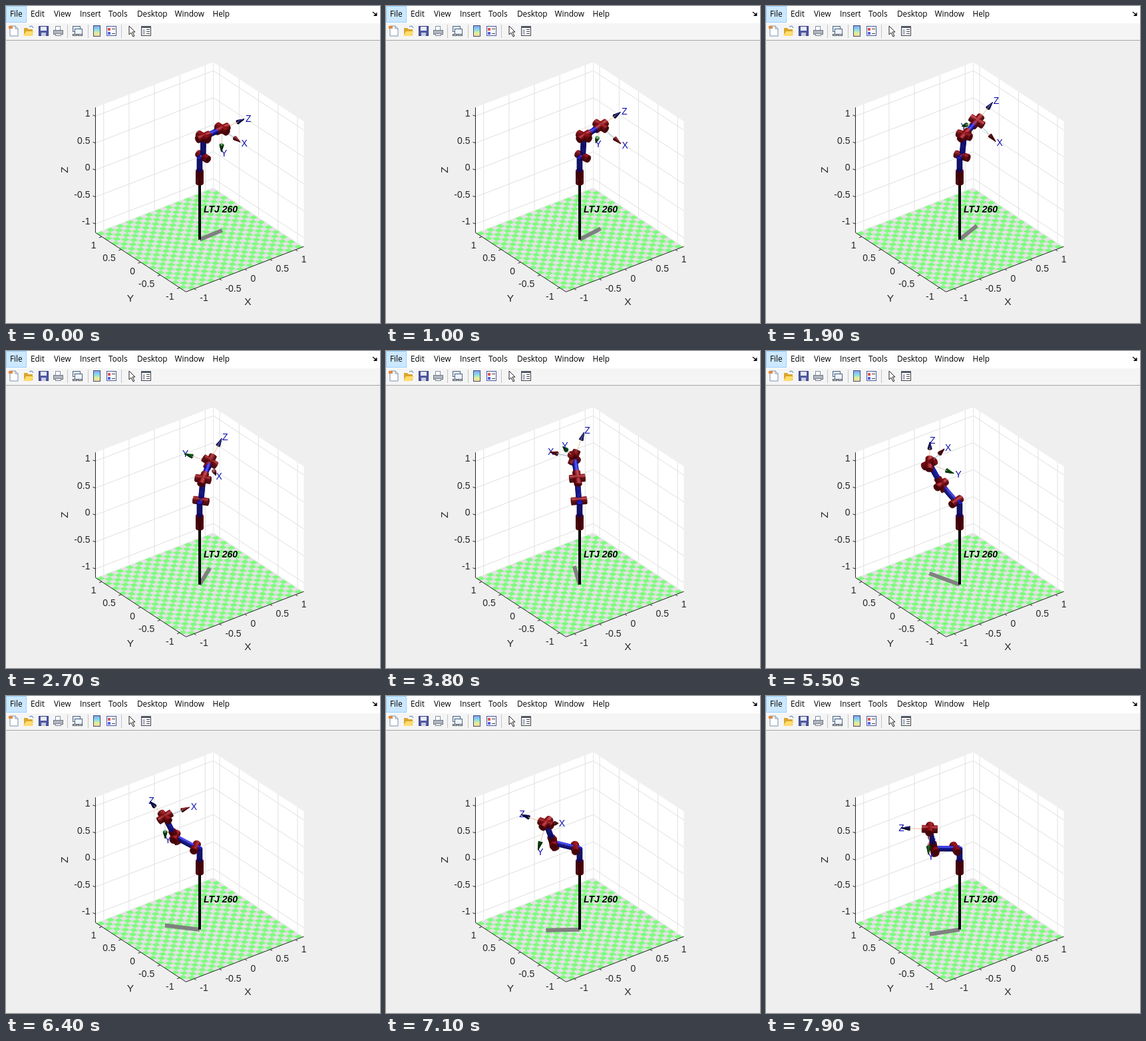
An HTML page with a canvas for the animation above (8 s loop, 562 by 476 pixels).

```html
<!DOCTYPE html>
<html lang="en">
<head>
<meta charset="utf-8">
<title>Robot arm plot</title>
<style>
  html, body { margin: 0; width: 100%; height: 100%; overflow: hidden; background: #efefef; }
  canvas { display: block; }
</style>
</head>
<body>
<canvas id="stage" width="562" height="476"></canvas>
<script>
const g = document.getElementById('stage').getContext('2d');
const SANS = '"Liberation Sans", Arial, sans-serif';
const LIM = 1.162, RAD = Math.PI / 180;
const VIEW = [-0.527, -0.687, 0.5];
const TICKS = [-1, -0.5, 0, 0.5, 1];

// ---------- vectors and projection ----------
const add = (p, v, k = 1) => p.map((c, i) => c + k * v[i]);
const dot = (a, b) => a[0] * b[0] + a[1] * b[1] + a[2] * b[2];
const cross = (a, b) => [a[1] * b[2] - a[2] * b[1], a[2] * b[0] - a[0] * b[2], a[0] * b[1] - a[1] * b[0]];
const unit = a => add([0, 0, 0], a, 1 / Math.hypot(...a));
const project = ([x, y, z]) => [291 + 76.2 * x - 58.5 * y, 256.7 - 29.3 * x - 38.3 * y - 80.9 * z];

// ---------- 2D helpers ----------
function trace(pts, closed) {
  g.beginPath();
  pts.forEach(p => g.lineTo(p[0], p[1]));
  if (closed) g.closePath();
}
function fill(pts, color) {
  trace(pts, true);
  g.fillStyle = color;
  g.fill();
}
function stroke(pts, color, width = 1) {
  trace(pts);
  g.strokeStyle = color;
  g.lineWidth = width;
  g.stroke();
}
function rect(x, y, w, h, color, edge) {
  g.fillStyle = color;
  g.fillRect(x, y, w, h);
  if (edge) {
    g.strokeStyle = edge;
    g.lineWidth = 1;
    g.strokeRect(x + 0.5, y + 0.5, w - 1, h - 1);
  }
}
function text(str, x, y, font, color = '#262626', align = 'left') {
  g.font = font;
  g.fillStyle = color;
  g.textAlign = align;
  g.textBaseline = 'middle';
  g.fillText(str, x, y);
}

// ---------- window chrome ----------
function drawMenu() {
  rect(0, 0, 562, 26, '#fff');
  rect(0, 0, 31, 25, '#cce8ff', '#99d1ff');
  const items = [['File', 6], ['Edit', 37], ['View', 72], ['Insert', 111], ['Tools', 154],
    ['Desktop', 197], ['Window', 253.5], ['Help', 310.5]];
  for (const [name, x] of items) text(name, x, 13, '11.8px "Open Sans", "Noto Sans", sans-serif', '#000');
  stroke([[551, 9], [556, 13]], '#000', 1.3);
  fill([[557.5, 9.5], [557.5, 15], [552, 15]], '#000');
}

function drawToolbar() {
  rect(0, 26, 562, 25, '#f5f5f5');
  rect(0, 51, 562, 1, '#a6a6a6');
  for (const x of [92, 123, 173]) rect(x, 28, 1, 20, '#c4c4c4');
  // new
  fill([[6, 30], [14, 30], [18, 34], [18, 45], [6, 45]], '#fff');
  stroke([[6, 30], [14, 30], [18, 34], [18, 45], [6, 45], [6, 30]], '#7890b0');
  stroke([[14, 30], [14, 34], [18, 34]], '#7890b0');
  rect(4, 30, 6, 4, '#e58a3c');
  // open
  fill([[27, 33], [32, 33], [34, 35], [40, 35], [40, 44], [27, 44]], '#d9a52c');
  fill([[30, 38], [42, 38], [38, 45], [26, 45]], '#ffdc6e');
  stroke([[35, 31], [39, 30], [41, 33]], '#4a78b8');
  // save
  rect(49, 30, 15, 15, '#5058a0', '#343c80');
  rect(52, 31, 9, 6, '#e6e9f8');
  rect(53, 40, 7, 5, '#c8cce0');
  // print
  rect(74, 30, 8, 7, '#fff', '#8090a8');
  rect(71, 36, 15, 7, '#b0b6c0', '#70767e');
  rect(74, 41, 9, 4, '#e8ecf2', '#808890');
  // link
  rect(100, 30, 12, 9, '#dce8f6', '#506480');
  rect(103, 34, 12, 9, '#eef4fb', '#506480');
  rect(100, 42, 7, 3, '#fff', '#404858');
  rect(108, 42, 7, 3, '#fff', '#404858');
  // color bar
  const bar = g.createLinearGradient(0, 30, 0, 45);
  ['#8c9cf0', '#80d8f0', '#d8f0a0', '#ffd890'].forEach((c, i) => bar.addColorStop(i / 3, c));
  rect(131, 29, 11, 17, bar, '#405078');
  // legend
  rect(151, 30, 15, 15, '#fff', '#4858a0');
  rect(153, 33, 4, 4, '#e05050');
  rect(153, 39, 4, 4, '#5060e0');
  rect(159, 34, 5, 1, '#404040');
  rect(159, 41, 5, 1, '#404040');
  // pointer
  const tip = [[185, 30], [185, 43], [188, 40], [191, 46], [193, 45], [190, 39], [194, 39], [185, 30]];
  fill(tip, '#fff');
  stroke(tip, '#222');
  // inspector
  rect(203, 30, 15, 15, '#fff', '#404048');
  rect(203, 30, 15, 3, '#505864');
  rect(205, 35, 4, 8, '#b8c0cc');
  for (const y of [35, 38, 41]) rect(211, y, 5, 1, '#404048');
}

// ---------- axes ----------
const line3 = (a, b, color, width) => stroke([project(a), project(b)], color, width);

// The tiles start at the low corner and stop just short of the far limits.
function drawFloor() {
  const count = 24, size = 2.3 / count;
  const square = (x, y, e) => [[x, y], [x + e, y], [x + e, y + e], [x, y + e]].map(p => project([...p, -LIM]));
  fill(square(-LIM, -LIM, 2.3), '#e2e2e2');
  for (let i = 0; i < count; i++) {
    for (let j = (i + 1) % 2; j < count; j += 2) {
      fill(square(i * size - LIM, j * size - LIM, size), '#80fb80');
    }
  }
}

function drawAxes() {
  const quad = (...pts) => pts.map(project);
  const L = LIM, font = '14px ' + SANS, title = '15.5px ' + SANS, dark = '#262626';
  fill(quad([-L, L, -L], [-L, L, L], [L, L, L], [L, L, -L]), '#fff');
  fill(quad([L, -L, -L], [L, -L, L], [L, L, L], [L, L, -L]), '#fff');
  for (const v of TICKS) {
    for (const path of [[[v, L, -L], [v, L, L]], [[L, v, -L], [L, v, L]],
      [[-L, L, v], [L, L, v]], [[L, L, v], [L, -L, v]]]) line3(...path, '#e0e0e0');
  }
  line3([L, L, -L], [L, L, L], '#e6e6e6');
  drawFloor();
  stroke(quad([-L, L, L], [-L, L, -L], [-L, -L, -L], [L, -L, -L]), dark);

  for (const v of TICKS) {
    const [xx, xy] = project([v, -L, -L]), [yx, yy] = project([-L, v, -L]), [zx, zy] = project([-L, L, v]);
    stroke([[xx, xy], [xx + 3, xy + 2]], dark);
    stroke([[yx, yy], [yx - 4, yy + 1.5]], dark);
    stroke([[zx, zy], [zx - 4, zy - 1.5]], dark);
    text(v, xx + 8.5, xy + 15, font);
    text(v, yx - 8.5, yy + 14, font, dark, 'right');
    text(v, zx - 8, zy - 3, font, dark, 'right');
  }
  text('X', 363.5, 445, title, dark, 'center');
  text('Y', 187, 440, title, dark, 'center');
  g.save();
  g.translate(89, 246);
  g.rotate(-Math.PI / 2);
  text('Z', 0, 0, title, dark, 'center');
  g.restore();
}

// ---------- solids, painted back to front ----------
let parts = [];
const LAMP = unit([1, 0, 1]);
const GLINTS = [unit(add(VIEW, [0, 0, 1])), unit(add(VIEW, LAMP))];

function shade(rgb, n) {
  const k = 0.45 + 0.35 * Math.max(0, n[2]) + 0.18 * Math.max(0, dot(n, LAMP));
  const spec = GLINTS.reduce((s, h) => s + 56 * Math.max(0, dot(n, h)) ** 20, 0);
  return `rgb(${rgb.map(c => Math.round(Math.min(255, c * k + spec))).join()})`;
}
function face(pts, n, rgb) {
  if (dot(n, VIEW) <= 0) return;
  const mid = pts.reduce((s, p) => add(s, p, 1 / pts.length), [0, 0, 0]);
  const flat = pts.map(project), color = shade(rgb, n);
  parts.push([dot(mid, VIEW), () => {
    fill(flat, color);
    g.strokeStyle = color;
    g.lineWidth = 0.5;
    g.stroke();
  }]);
}
// Tube from a to b; a zero end radius makes a cone.
function tube(a, b, r0, r1, rgb) {
  const axis = unit(add(b, a, -1)), len = Math.hypot(...add(b, a, -1));
  const u = unit(cross(axis, Math.abs(axis[2]) > 0.8 ? [1, 0, 0] : [0, 0, 1])), v = cross(axis, u);
  const sides = 22, cuts = Math.ceil(len / 0.03);
  const out = t => add(add([0, 0, 0], u, Math.cos(t)), v, Math.sin(t));
  const at = (f, t) => add(add(a, axis, f * len), out(t), r0 + (r1 - r0) * f);
  const angles = Array.from({ length: sides }, (_, i) => i / sides * 2 * Math.PI), w = 2 * Math.PI / sides;
  for (const t of angles) {
    const n = unit(add(out(t + w / 2), axis, (r0 - r1) / len));
    for (let i = 0; i < cuts; i++) {
      const f = i / cuts, h = (i + 1) / cuts;
      face([at(f, t), at(f, t + w), at(h, t + w), at(h, t)], n, rgb);
    }
  }
  face(angles.map(t => at(0, t)), add([0, 0, 0], axis, -1), rgb);
  if (r1) face(angles.map(t => at(1, t)), axis, rgb);
}

const RED = [150, 12, 20], BLUE = [26, 26, 215];
const joint = f => tube(add(f.o, f.z, -0.12), add(f.o, f.z, 0.12), 0.058, 0.058, RED);
const link = (a, b) => tube(a, b, 0.04, 0.04, BLUE);

function arrow(o, dir, name, rgb, color) {
  const steps = 8;
  for (let i = 0; i < steps; i++) {
    const a = add(o, dir, 0.33 * i / steps), b = add(o, dir, 0.33 * (i + 1) / steps);
    parts.push([dot(a, VIEW), () => line3(a, b, color, 1)]);
  }
  tube(add(o, dir, 0.31), add(o, dir, 0.445), 0.033, 0, rgb);
  const p = add(o, dir, 0.48), [x, y] = project(p);
  parts.push([dot(p, VIEW), () => text(name, x - 0.5, y + 1, '14px ' + SANS, '#1010b0')]);
}

// ---------- kinematics ----------
const START = [0, -90, 180, 0, 0, -90], END = [180, 0, 0, 180, -90, 180];
// offset d, length a, twist per joint
const DH = [[0.352, 0.07, -90], [0, 0.36, 0], [0, 0, 90], [0.38, 0, -90], [0, 0, 90], [0, 0, 0]];

function nextFrame({ o, x, y, z }, angle, [d, a, twist]) {
  const mix = (p, q, t) => add(add([0, 0, 0], p, Math.cos(t * RAD)), q, Math.sin(t * RAD));
  const nx = mix(x, y, angle), ny = mix(y, x, -angle);
  return { o: add(add(o, z, d), nx, a), x: nx, y: mix(ny, z, twist), z: mix(z, ny, -twist) };
}

function drawRobot(s) {
  const frames = [{ o: [0, 0, 0], x: [1, 0, 0], y: [0, 1, 0], z: [0, 0, 1] }];
  DH.forEach((row, i) => frames.push(nextFrame(frames[i], START[i] + (END[i] - START[i]) * s, row)));
  const [base, shoulder, elbow, , wrist] = frames, tool = frames[6];
  const post = [0, 0, DH[0][0]], floor = [0, 0, -LIM];

  line3(floor, [wrist.o[0], wrist.o[1], -LIM], '#808080', 6);
  line3(floor, base.o, '#000', 4);

  parts = [];
  frames.slice(0, 6).forEach(joint);
  link(base.o, post);
  link(post, shoulder.o);
  link(shoulder.o, elbow.o);
  link(elbow.o, wrist.o);
  arrow(tool.o, tool.x, 'X', [125, 10, 18], '#8fb0c0');
  arrow(tool.o, tool.y, 'Y', [8, 105, 22], '#dcbcb0');
  arrow(tool.o, tool.z, 'Z', [12, 12, 95], '#ecc090');
  parts.sort((a, b) => a[0] - b[0]).forEach(p => p[1]());

  text('LTJ 260', 297, 306, 'italic bold 14px ' + SANS, '#000');
}

// ---------- playback ----------
const quintic = t => t ** 3 * (10 - 15 * t + 6 * t * t);
let shown = -1;

function tick(now) {
  const step = Math.floor(now % 8000 / 100);
  if (step !== shown) {
    shown = step;
    rect(0, 0, 562, 476, '#efefef');
    drawMenu();
    drawToolbar();
    drawAxes();
    drawRobot(quintic(0.107 + 0.00803 * step));
  }
  requestAnimationFrame(tick);
}
tick(performance.now());
</script>
</body>
</html>
```
